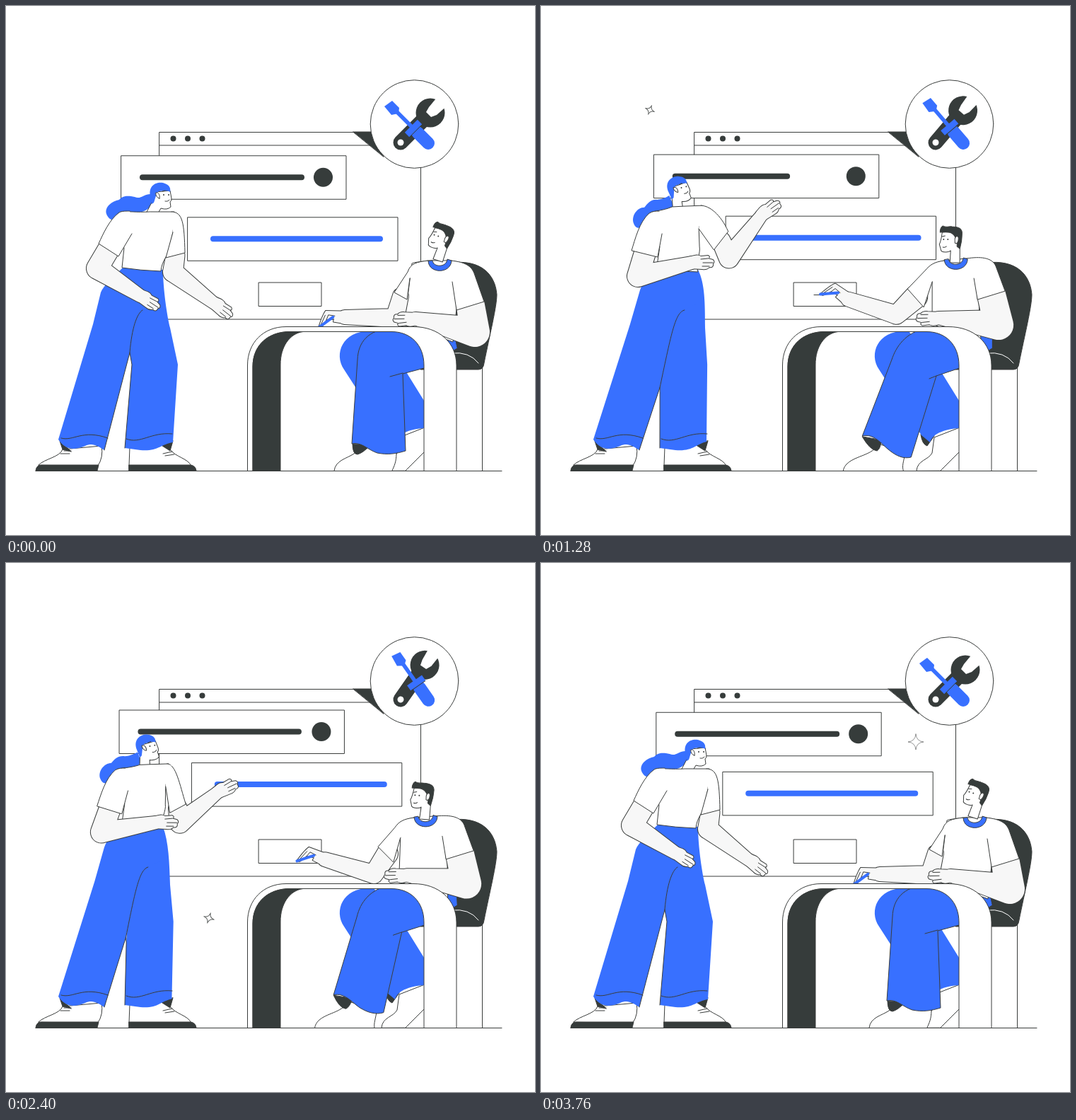
An HTML page with a canvas for the animation above (3.84 s loop, 748 px wide and 748 px high).

```html
<!DOCTYPE html>
<html lang="en">
<head>
<meta charset="utf-8">
<title>Team at work</title>
<style>
html, body { margin: 0; width: 100%; height: 100%; overflow: hidden; background: #fff; }
canvas { display: block; }
</style>
</head>
<body>
<canvas width="748" height="748"></canvas>
<script>
const ctx = document.querySelector('canvas').getContext('2d');
const BLUE = '#3870ff', DARK = '#363c3b', INK = '#3a3d3c', SKIN = '#f7f7f7', WHITE = '#fff';
const LOOP = 3840, STEP = 80, TAU = Math.PI * 2;
const POSE_TIMES = [0, 400, 960, 1600, 2080, 2720, 3600, 3840];

// ---- motion helpers ----
function curve(t, times, values) {
  let i = 0;
  while (i < times.length - 2 && t >= times[i + 1]) i++;
  const slope = j => (values[j + 1] - values[j]) / (times[j + 1] - times[j]);
  const tangent = j => {
    if (j === 0 || j === times.length - 1) return 0;
    const a = slope(j - 1), b = slope(j);
    return a * b <= 0 ? 0 : 2 * a * b / (a + b);
  };
  const span = times[i + 1] - times[i];
  const u = Math.min(1, Math.max(0, (t - times[i]) / span)), v = 1 - u;
  return values[i] * v * v * (1 + 2 * u) + values[i + 1] * u * u * (3 - 2 * u)
    + span * (tangent(i) * u * v * v - tangent(i + 1) * u * u * v);
}

// Each row is a pose; the last one returns to the first.
function pose(t, rows) {
  const all = [...rows, rows[0], rows[0]];
  return rows[0].map((_, c) => curve(t, POSE_TIMES, all.map(r => r[c])));
}

function mix(a, b, k) {
  const ends = b.match(/-?\d+/g);
  let i = 0;
  return a.replace(/-?\d+/g, n => (+n + (ends[i++] - n) * k).toFixed(2));
}

const wave = (t, mid, amp, peak) => mid + amp * Math.cos(TAU * (t - peak) / 4000);

// ---- drawing helpers ----
function shape(d, fill, line = INK, width = 1) {
  const p = new Path2D(d);
  if (fill) { ctx.fillStyle = fill; ctx.fill(p); }
  if (line) { ctx.strokeStyle = line; ctx.lineWidth = width; ctx.stroke(p); }
}

function bar(x1, y1, x2, y2, width, color, cap = 'round') {
  ctx.lineCap = cap;
  shape(`M${x1} ${y1}L${x2} ${y2}`, null, color, width);
  ctx.lineCap = 'round';
}

function disc(x, y, r, fill, line) {
  ctx.beginPath();
  ctx.arc(x, y, r, 0, TAU);
  ctx.fillStyle = fill;
  ctx.fill();
  if (line) { ctx.strokeStyle = line; ctx.lineWidth = 1; ctx.stroke(); }
}

function box(x, y, w, h, fill = WHITE) {
  shape(`M${x} ${y}h${w}v${h}h${-w}z`, fill);
}

function turned(x, y, degrees, px, py, draw) {
  ctx.save();
  ctx.translate(x, y);
  ctx.rotate(degrees * Math.PI / 180);
  ctx.translate(-px, -py);
  draw();
  ctx.restore();
}

function cone(path, ax, ay, bx, by, ra, rb) {
  const dir = Math.atan2(by - ay, bx - ax);
  const off = Math.acos((ra - rb) / Math.hypot(bx - ax, by - ay));
  path.moveTo(ax + ra * Math.cos(dir + off), ay + ra * Math.sin(dir + off));
  path.arc(ax, ay, ra, dir + off, dir - off + TAU);
  path.arc(bx, by, rb, dir - off, dir + off);
  path.closePath();
}

// Shoulder, elbow, wrist; one shared outline around arm and hand.
function arm([sx, sy, ex, ey, wx, wy, degrees], [rs, re, rw], hand) {
  const limb = new Path2D(), palm = new Path2D(), creases = new Path2D();
  cone(limb, sx, sy, ex, ey, rs, re);
  cone(limb, ex, ey, wx, wy, re, rw);
  const place = new DOMMatrix().translate(wx, wy).rotate(degrees);
  palm.addPath(new Path2D(hand.outline), place);
  creases.addPath(new Path2D(hand.creases), place);
  ctx.strokeStyle = INK;
  ctx.fillStyle = SKIN;
  ctx.lineWidth = 2;
  ctx.stroke(limb);
  ctx.stroke(palm);
  ctx.fill(limb);
  ctx.fill(palm);
  ctx.lineWidth = 1;
  ctx.stroke(creases);
}

const OPEN_HAND = {
  outline: 'M-4 -8C4 -10 8 -12 13 -9L23 -10Q27 -8 23 -6L30 -4Q33 -1 30 1L30 4Q29 7 25 6Q22 10 15 9L-4 8Z',
  creases: 'M13 -5L23 -6M16 0L30 0M15 5L25 5'
};
const PEN_HAND = {
  outline: 'M0 -10L-18 -22C-25 -19 -32 -13 -38 -8Q-37 -4 -32 -7L-24 -11L-14 -6L-17 -3Q-10 4 0 10Z',
  creases: 'M-34 -9L-22 -17M-26 -9L-18 -15L-11 -9'
};

// ---- scenery ----
function drawPanels(t) {
  box(217, 178.5, 369.5, 264.5);
  shape('M217 197H530');
  for (const x of [236.5, 257, 277.5]) disc(x, 187.5, 4, DARK);
  shape('M491 178H534V213Z', DARK);
  box(357.5, 391, 88.5, 33.5);

  const x1 = wave(t, 161.3, -1.9, 1700), y1 = wave(t, 210, 2, 320);
  const fill1 = curve(t, [960, 1440, 2480, LOOP], [1, .6, 1, 1]);
  box(x1, y1, 318, 61.5);
  bar(x1 + 30, y1 + 30.5, x1 + 30 + 225 * fill1, y1 + 30.5, 8, DARK);
  disc(x1 + 285.5, y1 + 30.5, 13.5, DARK);

  const x2 = wave(t, 260.2, -3.2, 0), y2 = wave(t, 292.5, 10.3, 580);
  const fill2 = curve(t, [1340, 1840, 2400, LOOP], [1, .53, 1, 1]);
  box(x2, y2, 297, 61.5);
  bar(x2 + 36, y2 + 30.5, x2 + 36 + 236 * fill2, y2 + 30.5, 8, BLUE);
}

function drawTools(t) {
  disc(577.5, 167, 62.3, WHITE, INK);
  const k = curve(t, [0, 640, 960, 1560, 1720, 2400, 3000, LOOP], [0, 1, 1, 0, 0, 1, 0, 0]);
  turned(558, 193, -10 * k, 558, 193, () => {
    bar(558, 193, 592, 159, 21, DARK);
    disc(600, 151, 20.5, DARK);
    shape('M594 150L598 143L612 126L626 139L609 154L601 157Z', WHITE, null);
    disc(558, 193, 4.5, WHITE);
  });
  turned(598, 195, 10 * k, 598, 195, () => {
    bar(548, 145, 582, 179, 5.5, BLUE, 'butt');
    shape('M535 142L546 134L556 144L555 152L545 154Z', BLUE, null);
    bar(582, 179, 597, 194, 18, BLUE);
    bar(567, 182, 585, 164, 9, BLUE, 'butt');
    shape('M571 185L588 168', null, DARK);
  });
}

function drawSparkle(x, y, age) {
  if (age < 0 || age > 900) return;
  const r = Math.min(11, 2 + age / 80), c = r * .08;
  ctx.globalAlpha = Math.min(1, (900 - age) / 270) * .8;
  turned(x, y, 45 * Math.max(0, 1 - age / 720), 0, 0, () => {
    shape(`M0 ${-r}Q${c} ${-c} ${r} 0Q${c} ${c} 0 ${r}Q${-c} ${c} ${-r} 0Q${-c} ${-c} 0 ${-r}Z`, WHITE);
  });
  ctx.globalAlpha = 1;
}

function drawChair() {
  shape('M673.5 510V657');
  shape('M630 363C672 358 692 380 694 408C694 425 684 465 676 505Q675 514 668 514H586V470Z', DARK);
  shape('M630 491Q655 488 668 505', null, WHITE);
}

function drawDesk() {
  const outer = 'M341.5 657V508C341.5 476 364 453.5 396 453.5H576C612 453.5 637 476 637 508V657';
  const hole = 'M591 657V508C591 480 573 460.5 545 460.5H402C370 460.5 349 480 349 510V657';
  const p = new Path2D(outer + 'H591' + hole.slice(8) + 'Z');
  ctx.fillStyle = WHITE;
  ctx.fill(p, 'evenodd');
  shape(outer);
  shape(hole);
  shape('M349 657V510C349 480 370 460.5 402 460.5H420C401 463 388 482 388 507V657Z', DARK);
}

// ---- people ----
function drawMan(t) {
  const [k] = pose(t, [[0], [.15], [1], [.98], [.97], [.42]]);

  shape('M531 657C532 642 548 642 553 632L556 610L592 596V630L565 657Z', WHITE);
  shape('M537 606Q539 620 546 622L556 608Z', DARK);
  shape('M520 460C478 456 462 490 478 514L538 607L550 617C554 603 575 598 591 597V558L565 516Z', BLUE, null);
  shape(mix('M464 657C466 642 482 640 492 633L510 624L552 632C552 645 549 650 546 657',
            'M427 657C430 640 455 638 468 629L480 620L515 632C512 645 510 650 512 657', k), WHITE);
  shape(mix('M490 619Q490 634 497 634Q505 632 515 621Z',
            'M454 609Q465 628 475 629Q480 626 481 614Z', k), DARK);
  shape(mix('M634 466L575 452L545 455C512 458 498 475 497 500L489 619C503 616 512 628 525 632C540 635 552 633 565 629L561 520L595 511L638 484Z',
            'M638 466L575 452L545 455C515 462 502 482 496 500L454 608C470 604 480 618 492 628C502 636 512 641 523 638L559 523L595 511L638 484Z', k), BLUE);
  shape(mix('M543 524L561 519', 'M549 527L559 523', k));

  shape(mix('M597 360C585 362 578 362 574 364L563 450L632 475L640 400L645 363L629 360Z',
            'M570 360C560 362 556 364 553 370L553 450L622 475L618 400L625 360L602 357Z', k), WHITE);

  const left = pose(t, [
    [558, 410, 550, 441, 479, 440, -32],
    [554, 410, 542, 441, 472, 437, -35],
    [530, 411, 499, 436, 428, 414, 0],
    [531, 411, 508, 438, 443, 415, 0],
    [533, 411, 512, 440, 450, 415, 0],
    [547, 411, 530, 440, 452, 426, -28]
  ]);
  if (t >= 960 && t < 2320) shape(`M386 408.5H${Math.max(386, left[4] - 38)}`);
  arm(left, [11 + 5 * k, 13, 10], PEN_HAND);
  turned(left[4], left[5], left[6], 0, 0, () => bar(-39, -7, -14, -9, 4, BLUE));
  shape(mix('M597 360C580 362 572 364 568 376L549 405L567 415L571 385',
            'M570 360C555 362 550 366 543 374L518 400L541 426L553 390', k), WHITE);

  arm([657 - 20 * k, 424 - 15 * k, 663 - 16 * k, 461 - 10 * k, 579 - 17 * k, 442 - k, 179],
      [20, 21, 9], OPEN_HAND);
  shape(mix('M629 360C650 362 658 368 662 378L676 418L637 430L631 390',
            'M602 357C620 354 638 355 643 368L656 403L617 415L612 385', k), WHITE);

  turned(616 - 36 * k, 327 + 3 * k, 18 * (1 - k), 580, 330, () => {
    shape('M567 320C566 328 565 333 563 337L565 344Q565 348 572 348Q577 348 579 346L578 363L592 363V330L585 318Z', WHITE);
    shape('M564 320C564 315 566 312 568 311C573 314 577 311 581 312C590 312 596 315 595 323C595 333 593 339 592 343L588 340L588 332L585 326C580 318 573 320 564 320Z', DARK);
    shape('M585 333C584 326 589 323 590 328C590 334 588 337 585 335Z', WHITE);
    disc(569, 330, 1, INK);
    disc(575, 330, 1, INK);
    shape('M567 326L571 325M568 341Q571 342 573 340');
  });
  turned(-27 * k, -2 * k, 0, 0, 0, () =>
    shape('M597 361C598 379 629 379 630 360L624 358C623 370 604 370 603 360Z', BLUE));
}

function drawWoman(t) {
  const [k] = pose(t, [[0], [.66], [1], [.97], [.97], [.5]]);

  shape('M46 649C55 640 76 638 80 627L135 622Q138 638 130 650Z', WHITE);
  shape('M42 657Q43 649 50 649H131L129 657Z', DARK);
  shape('M175 624L174 650H262C256 639 240 638 232 627L220 618Z', WHITE);
  shape('M174 649H261Q268 650 269 657H174Z', DARK);
  shape('M77 633L90 633M82 629L92 629M222 633L235 630M225 636L238 634');
  shape('M76 615L80 627L92 630ZM236 615L232 629L218 620Z', DARK);

  shape(mix('M178 372L222 373C222 400 228 440 232 455L243 507L236 617C218 620 215 630 190 628L168 625L178 507L174 485Z',
            'M178 372L222 373C232 392 232 420 232 455L235 507L234 616C218 620 215 630 190 628L168 625L168 540L174 485Z', k), BLUE, null);
  shape(mix('M165 370C150 385 138 395 134 405L123 450L74 613C85 630 100 627 112 622C122 617 130 622 139 628L175 490C178 455 185 435 193 430L222 420L222 373Z',
            'M160 370C152 380 144 390 140 402L126 450L74 613C85 630 100 627 112 622C122 617 130 622 139 628L168 540C185 460 190 433 203 430L222 420L222 373Z', k), BLUE, null);
  shape(mix('M139 628L175 490C178 455 185 435 193 430',
            'M139 628L168 540C185 460 190 433 203 430', k));
  shape(mix('M175 490L178 507L168 625', 'M168 540L168 545L168 625', k));
  shape('M78 611C95 616 108 598 144 611M170 612C190 620 205 602 235 605');

  shape(mix('M204 266C195 266 190 274 182 270C172 268 165 268 160 274C150 276 139 284 142 294C145 302 152 305 156 300C162 291 170 290 178 291C190 294 199 290 208 280Z',
            'M181 268C175 272 170 273 164 274C155 273 150 280 146 285C135 285 127 298 131 308C134 316 140 315 147 311C152 300 160 292 168 291C177 290 183 288 187 282Z', k), BLUE, null);

  turned(218 - 24 * k, 270 - 9 * k, -14 * k, 218, 270, () => {
    shape(mix('M212 263L232 261L234 272Q234 276 232 277L233 284Q228 289 219 286L215 293L198 293L207 276Z',
              'M212 263L232 261L234 272Q234 276 232 277L233 284Q228 289 219 286L218 298L203 300L207 276Z', k), WHITE);
    shape('M204 269C201 254 212 248 222 250C232 253 233 258 232 263C227 260 220 262 216 262C212 265 212 270 209 278L206 280Z', BLUE, null);
    shape('M217 272C214 272 211 267 212 264C216 263 218 268 217 272Z', WHITE);
    disc(223, 267, 1, INK);
    disc(230, 267, 1, INK);
    shape('M221 262L225 261M225 276Q229 277 231 274');
  });

  const [ox, oy, ix, iy, ...right] = pose(t, [
    [253, 349, 226, 356, 236, 376, 294, 420, 38],
    [250, 345, 220, 358, 233, 371, 292, 336, -3],
    [257, 330, 236, 347, 249, 366, 296, 306, -38],
    [270, 312, 249, 344, 277, 349, 326, 291, -32],
    [265, 324, 246, 345, 263, 360, 311, 300, -32],
    [246, 353, 219, 361, 234, 373, 292, 357, -12]
  ]);
  arm([(ox + ix) / 2, (oy + iy) / 2, ...right], [13, 14, 8.5], OPEN_HAND);

  shape(mix('M203 291C185 292 172 290 162 291L160 330L167 342L164 370Q190 374 219 375C220 360 230 352 230 345L236 320L238 291L218 291Z',
            'M185 284C170 290 162 289 155 292L158 330L168 340L163 374Q190 374 222 376C218 362 226 350 224 340L223 315L228 282L202 283Z', k), WHITE);
  const [tx, ty, px, py] = [234 - 8 * k, 291 - 9 * k, 236 - 13 * k, 320 - 5 * k];
  shape(`M${tx} ${ty}C${tx + 16 - 4 * k} ${ty} ${ox - 1 - 10 * k} ${oy - 42 + 18 * k} ${ox} ${oy}L${ix} ${iy}L${px} ${py}`, WHITE);
  // Hides the seam between sleeve and shirt.
  shape(`M${tx - 4} ${ty + 1}L${tx + 6} ${ty + 2}L${px + 3} ${py - 4}L${px - 5} ${py - 3}Z`, WHITE, null);

  arm(pose(t, [
    [145, 344, 129, 371, 190, 410, 33],
    [142, 347, 127, 380, 205, 391, 12],
    [147, 349, 137, 382, 213, 363, 0],
    [147, 349, 137, 382, 213, 363, 0],
    [147, 349, 137, 382, 213, 363, 0],
    [146, 347, 132, 378, 209, 375, 2]
  ]), [15, 15, 9], OPEN_HAND);
  shape(mix('M175 290C167 290 164 290 160 292C146 302 137 323 131 336L159 354L178 322',
            'M167 290C162 290 158 290 153 293C139 305 133 330 128 346L165 355L171 322', k), WHITE);
}

function draw(t) {
  ctx.fillStyle = WHITE;
  ctx.fillRect(0, 0, 748, 748);
  ctx.lineCap = ctx.lineJoin = 'round';
  drawPanels(t);
  drawTools(t);
  for (const [x, y, start] of [[287, 502, 360], [154, 147, 900], [530, 253, 1440]]) {
    drawSparkle(x, y, t - start);
    drawSparkle(x, y, t - start - 1600);
  }
  shape('M42 657.5H701');
  drawChair();
  drawMan(t);
  drawDesk();
  drawWoman(t);
}

const begin = performance.now();
function tick() {
  const t = (performance.now() - begin) % LOOP;
  draw(Math.floor(t / STEP) * STEP);
  requestAnimationFrame(tick);
}
tick();
</script>
</body>
</html>
```
